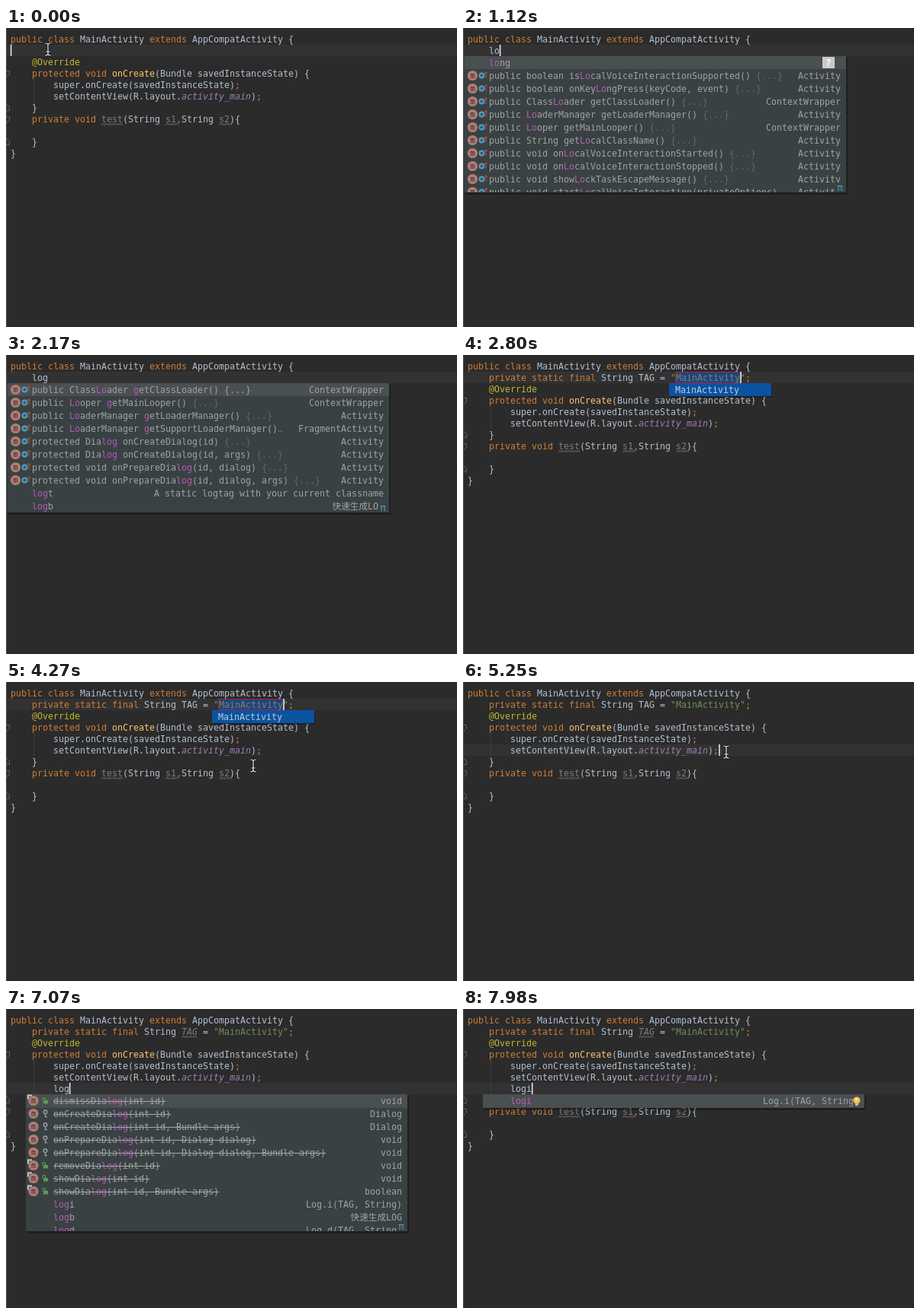
Animation of 591 by 393 pixels, one loop 8 s. Source, as an HTML page:

```html
<!DOCTYPE html>
<html lang="en">
<head>
<meta charset="utf-8">
<title>Live templates</title>
<style>
  html, body { margin: 0; width: 100%; height: 100%; overflow: hidden; background: #2b2b2b; }
  svg { display: block; width: 100vw; height: 100vh; }
  text { font: 11.64px "DejaVu Sans Mono", "Noto Sans CJK SC", "Noto Sans CJK", monospace; white-space: pre; fill: #b3c0cf; }
  .k { fill: #d07d36; }
  .a { fill: #bfb92c; }
  .f { fill: #ffc66d; }
  .s { fill: #6f8d5d; }
  .p { fill: #a07db4; font-style: italic; }
  .u { fill: #7c7e80; }
  .t { fill: #7c7e80; font-style: italic; }
  .row { fill: #a0a3a4; }
  .hit { fill: #b25cb6; }
  .dim { fill: #62686a; }
  .old { text-decoration: line-through; }
</style>
</head>
<body>
<svg id="stage" viewBox="0 0 591 393" preserveAspectRatio="none"></svg>
<script>
const stage = document.getElementById("stage");
const LOOP = 8000, STEP = 70;
const CHAR = 7.008, LEFT = 6, LINE = 15, ROW = 17;
const colX = col => LEFT + col * CHAR;
const baseY = line => 19 + line * LINE;
const rect = (x, y, w, h, fill, more = "") =>
  `<rect x="${x}" y="${y}" width="${w}" height="${h}" fill="${fill}" ${more}/>`;
const path = (d, stroke, width = 1, more = "") =>
  `<path d="${d}" fill="none" stroke="${stroke}" stroke-width="${width}" ${more}/>`;
const text = (x, y, body, more = "") => `<text x="${x}" y="${y}" ${more}>${body}</text>`;
const span = (cls, body) => `<tspan class="${cls}">${body}</tspan>`;

// Code lines; «x…» gives a run the style class x
const HEAD = "«kpublic class» MainActivity «kextends» AppCompatActivity {";
const BODY = [
  "    «a@Override»",
  "    «kprotected void» «fonCreate»(Bundle savedInstanceState) {",
  "        super.onCreate(savedInstanceState)«k;»",
  "        setContentView(R.layout.«pactivity_main»)«k;»"
];
const TAIL = ["    }", "    «kprivate void» «utest»(String «us1»«k,»String «us2»){", "", "    }", "}"];
const tagLine = unused =>
  `    «kprivate static final» String ${unused ? "«tTAG»" : "TAG"} = «s"MainActivity"»«k;»`;

function wave(col, count, y) {
  const n = Math.round(count * CHAR / 4);
  return path(`M${colX(col)} ${y}` + "l2 -2l2 2".repeat(n), "#85878a", 0.9);
}

function codeLine(src, line) {
  let col = 0, body = "", marks = "";
  for (const part of src.split(/(«.*?»)/)) {
    if (part[0] !== "«") { body += part; col += part.length; continue; }
    const cls = part[1], run = part.slice(2, -1);
    body += span(cls, run);
    if (cls === "u" || cls === "t") marks += wave(col, run.length, baseY(line) + 3.5);
    col += run.length;
  }
  return text(LEFT, baseY(line), body) + marks;
}

// Completion rows: icon kind | label | type
const LISTS = {
  members: [
    "|long|",
    "m|public boolean isLocalVoiceInteractionSupported() {...}|Activity",
    "m|public boolean onKeyLongPress(keyCode, event) {...}|Activity",
    "m|public ClassLoader getClassLoader() {...}|ContextWrapper",
    "m|public LoaderManager getLoaderManager() {...}|Activity",
    "m|public Looper getMainLooper() {...}|ContextWrapper",
    "m|public String getLocalClassName() {...}|Activity",
    "m|public void onLocalVoiceInteractionStarted() {...}|Activity",
    "m|public void onLocalVoiceInteractionStopped() {...}|Activity",
    "m|public void showLockTaskEscapeMessage() {...}|Activity",
    "m|public void startLocalVoiceInteraction(privateOptions)|Activity"
  ],
  narrowed: [
    "m|public ClassLoader getClassLoader() {...}|ContextWrapper",
    "m|public Looper getMainLooper() {...}|ContextWrapper",
    "m|public LoaderManager getLoaderManager() {...}|Activity",
    "m|public LoaderManager getSupportLoaderManager()…|FragmentActivity",
    "m|protected Dialog onCreateDialog(id) {...}|Activity",
    "m|protected Dialog onCreateDialog(id, args) {...}|Activity",
    "m|protected void onPrepareDialog(id, dialog) {...}|Activity",
    "m|protected void onPrepareDialog(id, dialog, args) {...}|Activity",
    "|logt|A static logtag with your current classname",
    "|logb|快速生成LOG"
  ],
  logt: ["|logt|A static logtag with your current classname"],
  calls: [
    "o|dismissDialog(int id)|void",
    "y|onCreateDialog(int id)|Dialog",
    "y|onCreateDialog(int id, Bundle args)|Dialog",
    "y|onPrepareDialog(int id, Dialog dialog)|void",
    "y|onPrepareDialog(int id, Dialog dialog, Bundle args)|void",
    "o|removeDialog(int id)|void",
    "o|showDialog(int id)|void",
    "o|showDialog(int id, Bundle args)|boolean",
    "|logi|Log.i(TAG, String)",
    "|logb|快速生成LOG",
    "|logd|Log.d(TAG, String)"
  ],
  logi: ["|logi|Log.i(TAG, String)"]
};

function markHits(label, query) {
  const whole = new RegExp(query, "i");
  if (whole.test(label)) return label.replace(whole, m => span("hit", m));
  return label.replace(/(lo)(.*? )(g)/i, (m, a, b, c) => span("hit", a) + b + span("hit", c));
}

function rowIcons(kind, x, y) {
  if (!kind) return "";
  const cx = kind === "m" ? x + 11 : x + 10;
  let out = `<circle cx="${cx}" cy="${y}" r="6.6" fill="#b17b74"/>` +
    text(cx, y + 3.2, "m", 'text-anchor="middle" style="font-size:10px;fill:#33292a"');
  if (kind === "m") {
    out += `<circle cx="${x + 23}" cy="${y}" r="3" fill="#2f5f7c" stroke="#5a9cc0" stroke-width="1.8"/>` +
      path(`M${x + 28.5} ${y + 3}v-8m-2 2.5l2 -2.5l2 2.5`, "#b4533f");
  } else if (kind === "o") {
    out += path(`M${cx - 7} ${y - 2}v-5h5`, "#c6c9ca", 2) +
      rect(x + 23, y - 0.5, 6, 4.5, "#5c9a56") +
      path(`M${x + 22} ${y}v-2a1.8 1.8 0 0 1 3.6 0v2`, "#5c9a56", 1.2);
  } else {
    out += `<circle cx="${x + 25.5}" cy="${y - 2.2}" r="2.3" fill="none" stroke="#9ba0a2" stroke-width="1.4"/>` +
      path(`M${x + 25.5} ${y}v5m0 -1h2.4`, "#9ba0a2", 1.3);
  }
  return out;
}

function bulb(x, y) {
  return `<circle cx="${x}" cy="${y - 1}" r="4.6" fill="#f0c052"/>` +
    `<circle cx="${x - 0.5}" cy="${y - 2}" r="2" fill="#ffe39a"/>` + rect(x - 2, y + 3, 4, 3, "#b9b9b9");
}

function popup(name, query, inBody, hasBulb) {
  const rows = LISTS[name];
  const x = inBody ? 26 : 1.5, y = inBody ? 112 : 37, w = inBody ? 500 : 500.5;
  const h = rows.length > 10 ? (inBody ? 180 : 179) : rows.length * ROW + (inBody && rows.length < 2 ? 1 : 0);
  const textX = colX(inBody ? 8 : 4), right = x + w - 7;
  let out = rect(x + 1, y + 2, w + 1, h + 1, "#000", 'opacity=".28"') + rect(x, y, w, h, "#3a4143");
  out += rect(x, y, w, ROW + (inBody ? 1 : 0), "#4a4f51");
  let list = "";
  rows.forEach((row, i) => {
    const [kind, label, type] = row.split("|");
    const top = y + i * ROW, base = top + 13.2;
    const old = kind === "o" || kind === "y" ? " old" : "";
    let body = markHits(label, query);
    if (i) body = body.replace(/\{\.\.\.\}|…/, m => span("dim", m));
    list += rowIcons(kind, x, top + 8.5) + text(textX, base, body, `class="row${old}"`) +
      text(right, base, type, 'class="row" text-anchor="end"');
  });
  out += `<clipPath id="list">${rect(x, y, w, h, "#fff")}</clipPath><g clip-path="url(#list)">${list}</g>`;
  if (name === "members") {
    out += rect(471, 38, 16, 15, "#c9cbcc") +
      text(479, 49.5, "?", 'text-anchor="middle" style="fill:#fff;font-weight:bold"');
  }
  const ex = x + w, ey = y + h;
  if (hasBulb) return out + rect(ex - 14, ey - 16, 14, 15, "#4a4f51") + bulb(516, 121);
  return out + rect(ex - 14, ey - 13, 14, 13, rows.length > 1 ? "#3a4143" : "#4a4f51") +
    text(ex - 8, ey - 2.5, "π", 'text-anchor="middle" style="fill:#469fbd;font-size:13px"');
}

// Each entry changes the fields it names and keeps the others
const EVENTS = [
  [0, { line: 1, col: 0, typed: "", caret: true, tag: "", extra: false, list: "" }],
  [210, { col: 4 }],
  [840, { typed: "l", col: 5 }],
  [980, { typed: "lo", col: 6, list: "members" }],
  [1680, { typed: "log", col: 7 }],
  [1750, { list: "narrowed" }],
  [2100, { caret: false }],
  [2380, { typed: "logt", col: 8, list: "logt", caret: true }],
  [2590, { typed: "", list: "", tag: "edit", col: 51 }],
  [4830, { tag: "plain", col: 53 }],
  [5250, { line: 5, col: 47 }],
  [5670, { tag: "unused" }],
  [5880, { extra: true, line: 6, col: 8 }],
  [6510, { typed: "l", col: 9 }],
  [6650, { typed: "lo", col: 10, list: "calls" }],
  [6860, { typed: "log", col: 11 }],
  [7420, { typed: "logi", col: 12, list: "logi" }],
  [7840, { bulb: true }]
];
const stateAt = t => Object.assign({}, ...EVENTS.filter(e => e[0] <= t).map(e => e[1]));

// Pointer keys: time, x, y
const MOVES = [
  [[0, 55, 28], [70, 58, 33], [140, 67, 50], [210, 56, 46], [280, 44, 39], [840, 44, 39]],
  [[3360, 367, 54], [3640, 367, 54], [4200, 324, 110], [4410, 324, 110], [4900, 345, 92],
   [5320, 345, 92], [5530, 433, 117], [5880, 433, 117]]
];

function pointer(t) {
  const now = Math.floor(t / STEP) * STEP;
  const keys = MOVES.find(m => now >= m[0][0] && now < m[m.length - 1][0]);
  if (!keys) return "";
  const i = keys.findIndex(k => k[0] > now);
  const [t0, x0, y0] = keys[i - 1], [t1, x1, y1] = keys[i];
  const p = (now - t0) / (t1 - t0);
  const d = "M-3.5 -8Q0 -8 0 -5.5V5.5Q0 8 -3.5 8M3.5 -8Q0 -8 0 -5.5M0 5.5Q0 8 3.5 8M-2.5 3H2.5";
  return `<g transform="translate(${x0 + (x1 - x0) * p} ${y0 + (y1 - y0) * p})">` +
    path(d, "#111", 3) + path(d, "#f2f2f2", 1.2) + "</g>";
}

function folds(shift) {
  const open = y => path(`M0 ${y - 3.5}H4.5V${y + 1.5}L0 ${y + 5.5}`, "#606263");
  const close = y => path(`M0 ${y + 4.5}H4.5V${y - 0.5}L0 ${y - 4.5}`, "#606263");
  return open(60) + close(104 + shift) + open(120 + shift) + close(149 + shift);
}

function draw(t) {
  const s = stateAt(t), shift = s.extra ? LINE : 0;
  const second = s.tag ? tagLine(s.tag === "unused") : "    " + s.typed;
  const lines = [HEAD, second, ...BODY, ...(s.extra ? ["        " + s.typed] : []), ...TAIL];
  const top = 22 + (s.line - 1) * LINE;
  let out = rect(0, 0, 591, 393, "#2b2b2b") + rect(1, top, 590, LINE, "#323232") +
    rect(0, 0, 1, 393, "#555") + folds(shift) + rect(36, 67, 1, 30 + shift, "#3d3d3d");
  if (s.tag === "edit") {
    out += rect(colX(39), 23, 12 * CHAR, 14, "#214283") +
      rect(colX(39) - 0.5, 22.5, 12 * CHAR + 1, 14, "none", 'stroke="#b3202c"');
  }
  out += lines.map(codeLine).join("");
  if (s.caret) out += rect(colX(s.col) - 0.2, top, 1.6, LINE, "#e4e4e4");
  if (s.tag === "edit") {
    out += rect(271, 39, 134, 17, "#000", 'opacity=".25"') + rect(270, 37, 134, 17, "#0b52a1") +
      text(278, 50, "MainActivity", 'style="fill:#c3cbd5"');
  }
  if (s.list) out += popup(s.list, s.typed, s.extra, s.bulb);
  return out + pointer(t);
}

let shown = "";
function tick(now) {
  const next = draw(now % LOOP);
  if (next !== shown) stage.innerHTML = shown = next;
  requestAnimationFrame(tick);
}
tick(0);
</script>
</body>
</html>
```
